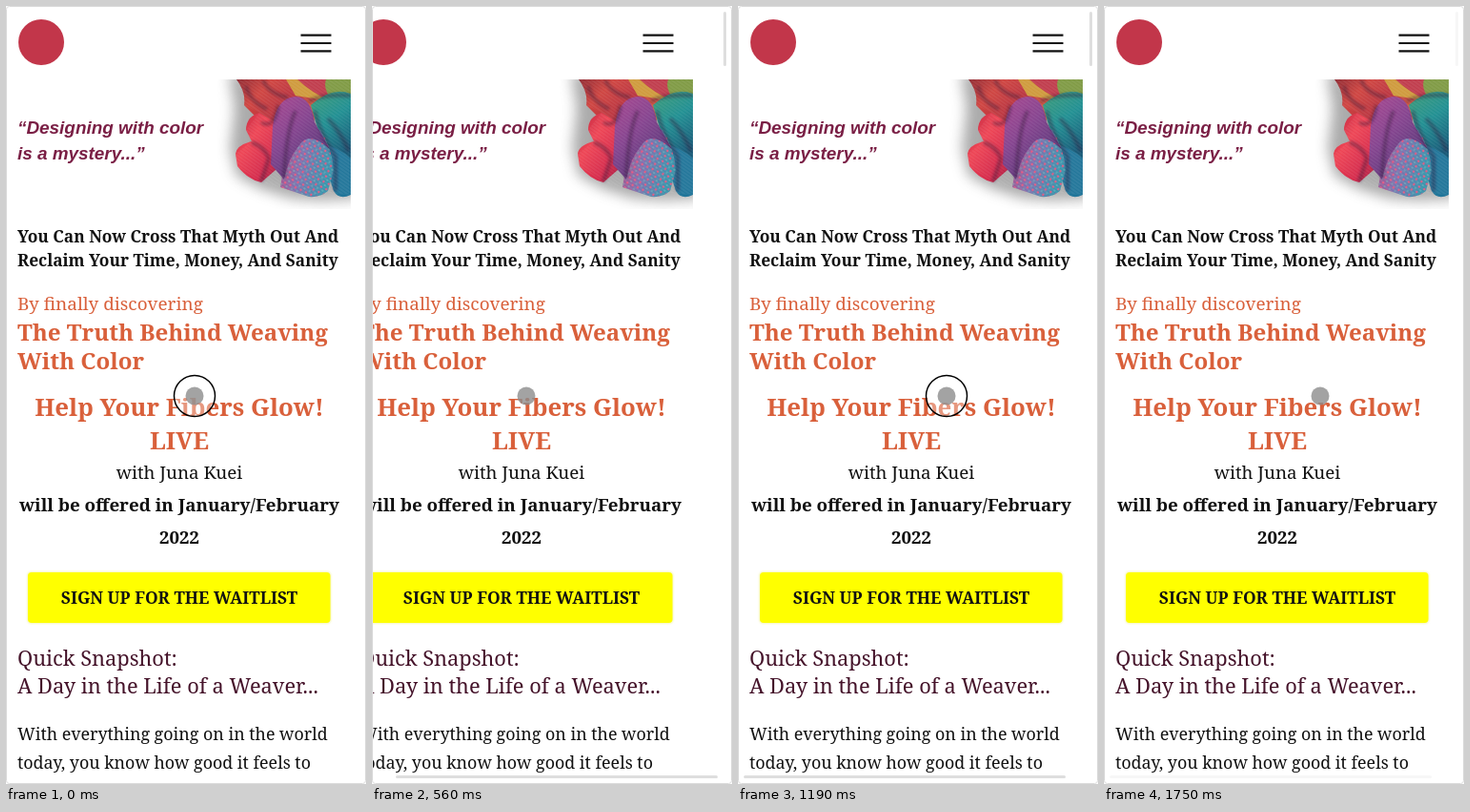
An HTML page that plays this animation: 378x816 px, repeating every 1.82 s.

```html
<!DOCTYPE html>
<html lang="en">
<head>
<meta charset="utf-8">
<title>Weaving page swipe</title>
<style>
  html, body { margin: 0; width: 100%; height: 100%; overflow: hidden; background: #fff; }
  svg { display: block; width: 100%; height: 100%; }
  text { font-family: "Noto Serif", serif; fill: #111; }
  .bold { font-weight: 700; }
  .mid { text-anchor: middle; }
  .quote { font: italic 700 18.9px "Liberation Sans", sans-serif; fill: #7a1f45; }
  .lead { font-size: 17.25px; }
  .orange { fill: #d9603b; }
  .plum { fill: #45132a; font-size: 21.8px; }
  .body { font-size: 17.85px; }
</style>
</head>
<body>
<svg viewBox="0 0 378 816" preserveAspectRatio="xMinYMin meet">
  <defs>
    <filter id="soft" x="-30%" y="-30%" width="160%" height="160%"><feGaussianBlur stdDeviation="7"/></filter>
    <filter id="fold"><feGaussianBlur stdDeviation="1.6"/></filter>
    <filter id="glow" x="-5%" y="-20%" width="110%" height="140%"><feGaussianBlur stdDeviation="1"/></filter>
    <clipPath id="photo"><rect x="222" y="77" width="140" height="136"/></clipPath>
    <linearGradient id="red" x2="1" y2="1">
      <stop stop-color="#b92740"/><stop offset=".35" stop-color="#ee4454"/><stop offset=".7" stop-color="#d42a4c"/><stop offset="1" stop-color="#8c1a3f"/>
    </linearGradient>
    <linearGradient id="coral" x2="1" y2=".6">
      <stop stop-color="#8f2a33"/><stop offset=".3" stop-color="#cf4440"/><stop offset=".6" stop-color="#b93440"/><stop offset="1" stop-color="#dd7440"/>
    </linearGradient>
    <linearGradient id="purple" x2=".7" y2="1">
      <stop stop-color="#a8468f"/><stop offset=".45" stop-color="#84428e"/><stop offset="1" stop-color="#4c3372"/>
    </linearGradient>
    <linearGradient id="teal" x2=".4" y2="1">
      <stop stop-color="#3d9a74"/><stop offset=".5" stop-color="#1f8f92"/><stop offset="1" stop-color="#175a78"/>
    </linearGradient>
    <linearGradient id="print" x2="1" y2=".3">
      <stop stop-color="#b8437f"/><stop offset=".5" stop-color="#7a70ae"/><stop offset="1" stop-color="#3792ab"/>
    </linearGradient>
    <pattern id="dots" width="6" height="6" patternUnits="userSpaceOnUse" patternTransform="rotate(25)">
      <circle cx="2" cy="2" r="1.2" fill="#e8557f"/><circle cx="5" cy="5" r=".8" fill="#6fc0bb"/>
    </pattern>
    <pattern id="weave" width="3" height="3" patternUnits="userSpaceOnUse" patternTransform="rotate(35)">
      <path d="M0 1H3" stroke="#fff" stroke-opacity=".13"/>
    </pattern>
  </defs>

  <rect width="378" height="816" fill="#fff"/>

  <g id="page">
    <circle cx="37" cy="38" r="24" fill="#c2364a"/>
    <path d="M309.5 30.7H341.5M309.5 39H341.5M309.5 47.3H341.5" stroke="#111" stroke-width="2.2"/>

    <g clip-path="url(#photo)">
      <path d="M234 70L240 108 235 150 242 178 268 192 300 202 330 204 370 202V70Z" fill="#666" opacity=".55" filter="url(#soft)"/>
      <path d="M242 77H332L336 112 300 134 268 122 250 104Q252 90 242 77Z" fill="url(#coral)"/>
      <path d="M294 77H362V112L330 98 304 94Z" fill="#cf9a3c"/>
      <path d="M306 77Q322 92 342 100L362 92V77Z" fill="#c03c4c"/>
      <path d="M336 77Q332 88 346 104L362 98V77Z" fill="#7f9a44"/>
      <path d="M320 104Q342 84 362 92V166L336 158Z" fill="url(#teal)"/>
      <path d="M266 112Q252 116 252 130L258 142Q242 146 241 155L243 168Q254 182 268 185L290 166 292 128Z" fill="url(#red)"/>
      <path d="M328 144Q350 148 362 160V198Q350 204 344 194Z" fill="#22769a"/>
      <path d="M296 144Q312 126 330 130 342 148 344 172L338 194Q330 201 318 200L288 190Z" fill="url(#print)"/>
      <path d="M296 144Q312 126 330 130 342 148 344 172L338 194Q330 201 318 200L288 190Z" fill="url(#dots)"/>
      <path d="M280 126Q284 96 304 95 320 95 324 122L340 150Q318 130 308 146 296 160 292 182L278 166Z" fill="url(#purple)"/>
      <g fill="none" stroke="#2c1030" stroke-width="4" opacity=".4" filter="url(#fold)">
        <path d="M258 143Q272 148 276 160L268 184M268 122Q282 130 286 104"/>
        <path d="M324 110Q330 134 346 158L346 194M318 100Q332 92 362 94"/>
        <path d="M304 110Q294 132 292 180M338 118Q350 130 360 152"/>
        <path d="M270 78Q276 92 296 96M252 84Q256 100 274 108"/>
      </g>
      <path d="M242 77H362V198L338 196 318 200 288 190 268 185 243 168 241 155 258 142 252 130 266 112 250 104Z" fill="url(#weave)"/>
    </g>

    <text class="quote" x="12" y="134">“Designing with color</text>
    <text class="quote" x="12" y="161">is a mystery...”</text>

    <text class="bold lead" x="12" y="248.3">You Can Now Cross That Myth Out And</text>
    <text class="bold lead" x="12" y="273.3">Reclaim Your Time, Money, And Sanity</text>

    <text class="orange" x="12" y="319" font-size="18.9">By finally discovering</text>
    <g class="bold" font-size="24.1">
      <text class="orange" x="12" y="351">The Truth Behind Weaving</text>
      <text class="orange" x="12" y="381">With Color</text>
    </g>
    <g class="bold mid" font-size="25.8">
      <text class="orange" x="182" y="430">Help Your Fibers Glow!</text>
      <text class="orange" x="182" y="465">LIVE</text>
    </g>

    <g class="mid" font-size="18.8">
      <text x="182" y="496">with Juna Kuei</text>
      <text class="bold" x="182" y="530">will be offered in January/February</text>
      <text class="bold" x="182" y="564">2022</text>
    </g>

    <rect x="22.5" y="593.5" width="318.5" height="54" rx="4" fill="#f3f3a0" filter="url(#glow)"/>
    <rect x="23" y="594" width="317.5" height="53" rx="4" fill="#ff0"/>
    <text class="bold mid" x="182" y="627" font-size="17.4">SIGN UP FOR THE WAITLIST</text>

    <text class="plum" x="12" y="692">Quick Snapshot:</text>
    <text class="plum" x="12" y="721">A Day in the Life of a Weaver...</text>

    <text class="body" x="12" y="770">With everything going on in the world</text>
    <text class="body" x="12" y="800">today, you know how good it feels to</text>
  </g>

  <g id="bars" fill="#dedede">
    <rect x="369" y="6" width="3" height="57" rx="1.5"/>
    <rect id="thumb" x="6" y="807" width="338" height="3" rx="1.5"/>
  </g>

  <g id="touch">
    <circle id="ring" r="21.5" fill="#fff" fill-opacity=".35" stroke="#000" stroke-width="1.5"/>
    <circle r="9.5" fill="#8c8c8c" fill-opacity=".8"/>
  </g>

  <rect x=".5" y=".5" width="377" height="815" rx="3" fill="none" stroke="#dcdcdc"/>
</svg>

<script>
  const LOOP = 1820, STEP = 70, MAX_SCROLL = 23;
  const el = id => document.getElementById(id);
  const page = el('page'), bars = el('bars'), thumb = el('thumb'), touch = el('touch'), ring = el('ring');

  // [time, value] pairs
  const finger = [[0, 198], [280, 171], [420, 163], [490, 162], [910, 162], [1190, 219], [1330, 227]];
  const shift = [[0, 0], [70, -1], [280, -12], [420, -21], [490, -24.5], [560, -25], [700, -23.6], [840, -23],
    [910, -22.5], [1050, -13], [1190, 0], [1330, 6], [1400, 6], [1470, 4], [1540, 2.3], [1610, 1.1], [1680, .4], [1750, 0]];
  const fade = [[0, 0], [140, 1], [700, 1], [910, .2], [980, 1], [1540, 1], [1750, .25]];

  function at(keys, t) {
    const i = keys.findIndex(k => k[0] > t);
    if (i < 0) return keys[keys.length - 1][1];
    const [t0, a] = keys[i - 1], [t1, b] = keys[i];
    return a + (b - a) * (t - t0) / (t1 - t0);
  }

  function draw(now) {
    const t = Math.floor(now % LOOP / STEP) * STEP;
    const x = at(shift, t);
    const scroll = Math.min(1, Math.max(0, -x / MAX_SCROLL));
    const held = t < 490 || (t >= 910 && t < 1330);
    page.setAttribute('transform', `translate(${x})`);
    thumb.setAttribute('x', 6 + 19 * scroll);
    bars.setAttribute('opacity', at(fade, t));
    touch.setAttribute('transform', `translate(${at(finger, t)} 409)`);
    ring.setAttribute('visibility', held ? 'visible' : 'hidden');
  }

  const start = performance.now();
  function tick() {
    draw(performance.now() - start);
    requestAnimationFrame(tick);
  }
  tick();
</script>
</body>
</html>
```
